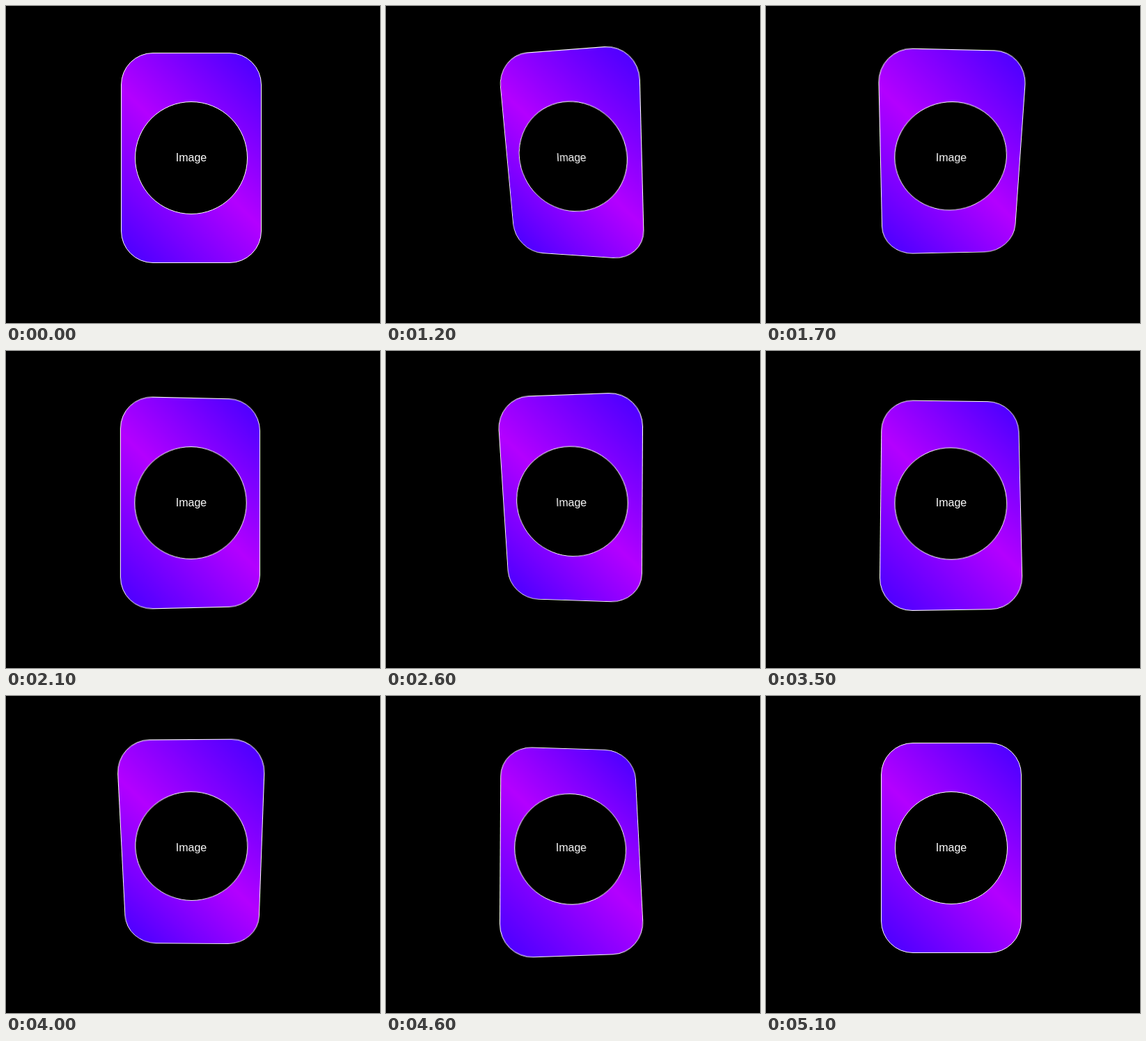
An HTML page for the animation above (5800 ms loop, 537 px wide and 455 px high).

```html
<!DOCTYPE html>
<html lang="en">
<head>
<meta charset="utf-8">
<title>Tilting card</title>
<style>
  html, body { margin: 0; height: 100%; overflow: hidden; background: #000; }
  .scene { position: absolute; left: 165px; top: 67px; width: 202px; height: 302px; perspective: 600px; }
  .card, .image {
    box-sizing: border-box;
    display: flex;
    align-items: center;
    justify-content: center;
    border: 1px solid #fff;
  }
  .card {
    width: 100%;
    height: 100%;
    border-radius: 46px;
    background: linear-gradient(45deg, #40f, #b300ff, #40f);
  }
  .image {
    width: 162px;
    height: 162px;
    border-radius: 50%;
    background: #000;
    color: #fff;
    font: 16px "Liberation Sans", Arial, sans-serif;
  }
</style>
</head>
<body>
<div class="scene"><div class="card"><div class="image">Image</div></div></div>
<script>
  const LOOP = 5800, STEP = 100, START = 1200, END = 5100;

  // Evenly timed points on the pointer's path, as tilt in degrees to the right and down
  const path = [
    [16.3, -12.2], [4, -15], [-8, -14], [-5.3, 0], [-3, -1], [13, -14], [15.2, 10.7],
    [-7, 13], [-1, 1], [-3.3, -13.7], [12, -10], [-4, 12], [-11, -1], [0, 0]
  ];
  const last = path.length - 1;
  const point = i => path[Math.max(0, Math.min(last, i))];
  const card = document.querySelector('.card');

  // Catmull-Rom through four neighbouring values
  const spline = (a, b, c, d, u) =>
    b + u / 2 * (c - a + u * (2 * a - 5 * b + 4 * c - d + u * (3 * (b - c) + d - a)));

  function tiltAt(time) {
    if (time < START || time >= END) return [0, 0];
    const place = (time - START) / (END - START) * last;
    const i = Math.floor(place);
    const [a, b, c, d] = [i - 1, i, i + 1, i + 2].map(point);
    return [0, 1].map(k => spline(a[k], b[k], c[k], d[k], place - i));
  }

  const origin = performance.now();
  function draw() {
    const time = (performance.now() - origin) % LOOP;
    const [x, y] = tiltAt(Math.floor(time / STEP) * STEP);
    card.style.transform = x || y ? `rotateY(${-x}deg) rotateX(${y}deg)` : 'none';
    requestAnimationFrame(draw);
  }
  draw();
</script>
</body>
</html>
```
